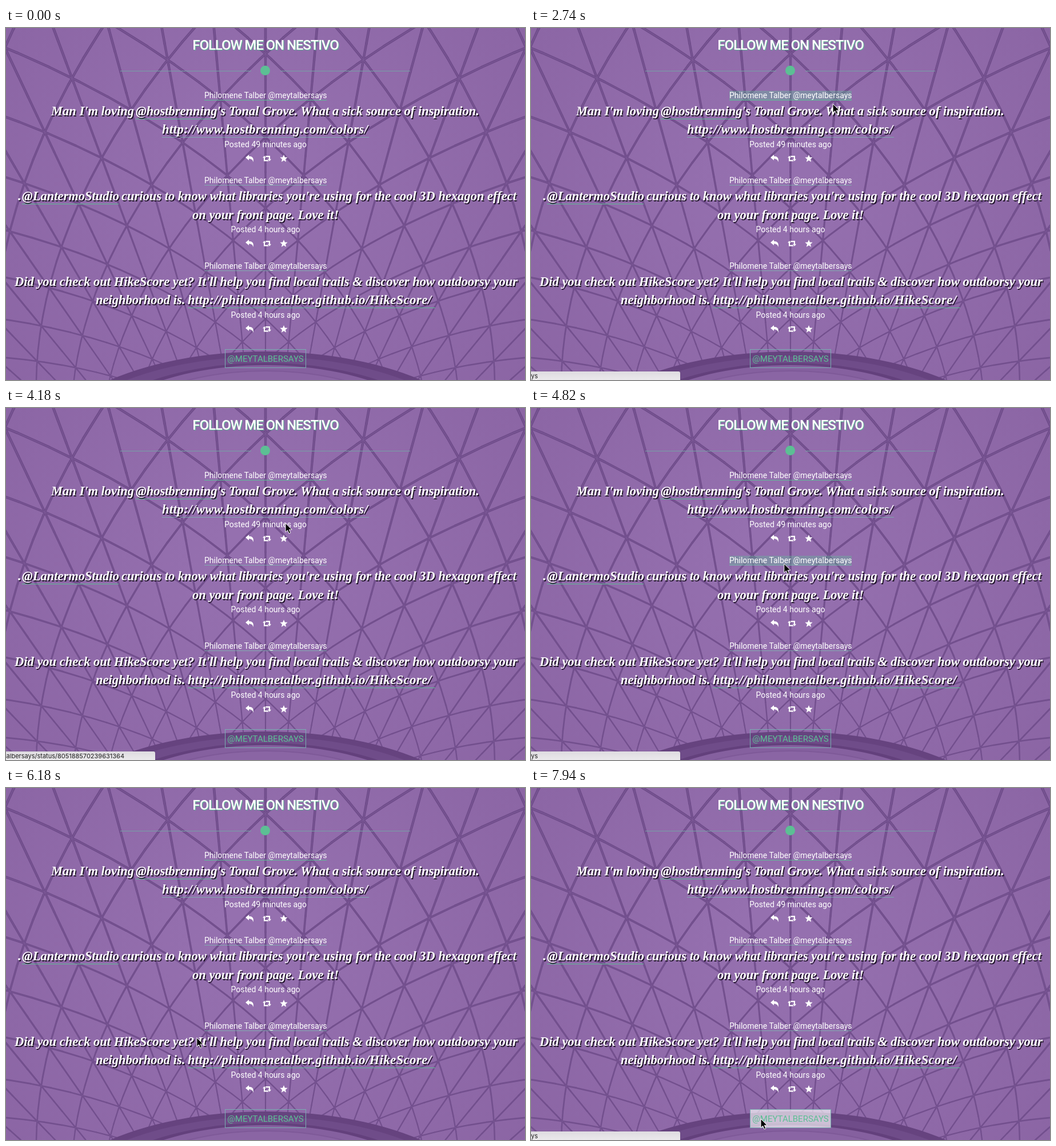
An HTML page with a canvas for the animation above (8000 ms loop, 908x617 px).

```html
<!DOCTYPE html>
<html lang="en">
<head>
<meta charset="utf-8">
<title>Follow me</title>
<style>
  html, body { margin: 0; width: 100%; height: 100%; overflow: hidden; background: #8f69a8; }
  #stage { position: relative; width: 908px; height: 617px; overflow: hidden; color: #fff;
    font: 14px Roboto, sans-serif; }
  #stage > * { position: absolute; white-space: pre; box-sizing: border-box; }
  canvas, svg { left: 0; top: 0; }
  h1 { margin: 0; left: 0; top: 18px; width: 908px; text-align: center; font-size: 24px; line-height: 24px;
    font-weight: 500; letter-spacing: -1.1px; text-shadow: 1px 1px 1px #5cbf94; }
  .rule { top: 75px; height: 1px; background: #74a3a5; }
  .dot { left: 445px; top: 66px; width: 17px; height: 17px; border-radius: 50%; background: #5cbf94; }
  .quote { font: italic bold 22.5px/28px "Liberation Serif", serif; text-shadow: 1.5px 1.5px 0 #1a1022; }
  .url { letter-spacing: .5px; }
  .name { height: 17px; line-height: 16px; text-align: center; }
  .quote.link { height: 28px; }
  .link { border-bottom: 1px solid #5cbf94; }
  .pale { border-color: rgba(120, 195, 175, .7); }
  .posted { left: 0; width: 908px; line-height: 20px; text-align: center; }
  .button { left: 383px; top: 563px; width: 142px; height: 33px; border: 1px solid #78aeb0; color: #5cbf94;
    font-size: 15px; line-height: 32px; display: flex; justify-content: center; }
  .bar { left: 0; top: 602px; width: 261px; height: 15px; border-radius: 0 3px 0 0;
    background: linear-gradient(#dedbe0, #ebe9ec); box-shadow: 0 0 1px #55406a; }
  .bar span { position: absolute; top: 1px; right: 54px; color: #1c1c1c; font: 11px/15px Inter, sans-serif; }
  .bar .short { right: auto; left: 0; }
</style>
</head>
<body>
<div id="stage">
  <canvas width="908" height="617"></canvas>
  <h1>FOLLOW ME ON NESTIVO</h1>
  <div class="rule" style="left:200px;width:229px"></div>
  <div class="dot"></div>
  <div class="rule" style="left:480px;width:227px"></div>
  <div class="button">@MEYTALBERSAYS</div>
  <svg id="icons" width="908" height="617" fill="#fff">
    <defs>
      <g id="actions">
        <path d="M419 227L425 222V224.8C431 224.8 434 228 432.500 235C431.500 231.500 430 229.300 425 229.300V232Z"/>
        <path id="turn" d="M452 224L455 227.600H453.200V231.200H458L459.600 233.400H451V227.600H449Z"/>
        <use href="#turn" transform="rotate(180 456.5 228.700)"/>
        <path id="star"/>
      </g>
    </defs>
  </svg>
  <div class="bar"><span></span></div>
  <svg width="908" height="617">
    <path id="cursor" d="M0 0V15.500L3.600 12.200L6.200 18L8.800 16.800L6.300 11.200H11.200Z"
      fill="#000" stroke="#fff" stroke-width="1"/>
  </svg>
</div>
<script>
const stage = document.getElementById('stage');
const icons = document.getElementById('icons');
const cursor = document.getElementById('cursor');
const button = stage.querySelector('.button');
const bar = stage.querySelector('.bar');
const label = bar.firstElementChild;

// Glass roof: radial beams crossed by two families of spirals, above an arch
function drawRoof() {
  const c = stage.querySelector('canvas').getContext('2d');
  const cx = 454, cy = 1000, inner = 415;
  const glow = c.createRadialGradient(430, 250, 60, 454, 300, 620);
  glow.addColorStop(0, '#9570af');
  glow.addColorStop(1, '#8a64a3');
  c.fillStyle = glow;
  c.fillRect(0, 0, 908, 617);

  const point = (r, a) => [cx + 1.2 * r * Math.sin(a), cy - r * Math.cos(a)];
  const beam = (start, twist, scale) => {
    const angle = r => start + twist * Math.log(r / inner);
    for (let r = inner; r < 1150; r *= 1.04) {
      c.lineWidth = r / 210 * scale;
      c.beginPath();
      c.moveTo(...point(r, angle(r)));
      c.lineTo(...point(r * 1.04, angle(r * 1.04)));
      c.stroke();
    }
  };
  const lattice = (color, scale) => {
    c.strokeStyle = color;
    const step = 0.15;
    for (let i = -14; i <= 14; i++) {
      beam(i * step, 0.9, scale);
      beam(i * step, -0.9, scale);
      beam(i * step / 2, 0, scale);
    }
  };
  c.lineCap = 'round';
  lattice('#6f4c8a', 1);
  lattice('#7b5896', 0.25);

  const arch = (rx, ry, fill) => {
    c.fillStyle = fill;
    c.beginPath();
    c.ellipse(cx, 760, rx, ry, 0, 0, 7);
    c.fill();
  };
  arch(405, 193, '#66437f');
  arch(385, 184, '#6f4c89');
  arch(350, 173, '#63407c');
  arch(335, 169, '#85609f');
  arch(310, 160, '#7e5998');
  arch(306, 158, '#8a65a4');
}

function add(text, cls, left, top, width) {
  const el = document.createElement('div');
  el.className = cls;
  el.textContent = text;
  if (left !== undefined) el.style.left = left + 'px';
  if (width) el.style.width = width + 'px';
  el.style.top = top + 'px';
  stage.insertBefore(el, button);
  return el;
}

function tweet(y, age, pale) {
  const name = add('Philomene Talber @meytalbersays', 'name link' + pale, 347, y + 110, 214);
  add('Posted ' + age + ' ago', 'posted', undefined, y + 194);
  const use = document.createElementNS('http://www.w3.org/2000/svg', 'use');
  use.setAttribute('href', '#actions');
  use.setAttribute('y', y);
  icons.append(use);
  return name;
}

const star = Array.from({ length: 10 }, (_, i) => {
  const r = i % 2 ? 3.1 : 7, a = i * Math.PI / 5;
  return (486 + r * Math.sin(a)).toFixed(2) + ' ' + (229 - r * Math.cos(a)).toFixed(2);
});
document.getElementById('star').setAttribute('d', 'M' + star.join('L') + 'Z');

drawRoof();
const name1 = tweet(0, '49 minutes', '');
add("Man I'm loving", 'quote', 79, 132);
add('@hostbrenning', 'quote link', 227, 132, 142);
add("'s Tonal Grove. What a sick source of inspiration.", 'quote', 369, 132);
const url1 = add('http://www.hostbrenning.com/colors/', 'quote url link pale', 273, 164, 362);

const name2 = tweet(149, '4 hours', ' pale');
add('.', 'quote', 21, 281);
add('@LantermoStudio', 'quote link', 28, 281, 169);
add("curious to know what libraries you're using for the cool 3D hexagon effect", 'quote', 202, 281);
add('on your front page. Love it!', 'quote', 326, 314);

tweet(299, '4 hours', ' pale');
add("Did you check out HikeScore yet? It'll help you find local trails & discover how outdoorsy your",
  'quote', 15, 431);
add('neighborhood is.', 'quote', 157, 463);
add('http://philomenetalber.github.io/HikeScore/', 'quote url link', 318, 463, 433);

// Each key: time in ms, then values
const path = [[420, 632, -18], [820, 606, 28], [1220, 606, 28], [1860, 542, 112], [2100, 535, 118],
  [2340, 533, 121], [2580, 533, 121], [3300, 511, 175], [3460, 507, 177], [3620, 504, 182],
  [4020, 504, 182], [4180, 489, 202], [4900, 437, 282], [5380, 420, 342], [5540, 420, 342],
  [6020, 335, 430], [6100, 335, 430], [6980, 322, 515], [7220, 333, 545], [7860, 402, 580]];
const fades = [
  [name1, '92,191,148', .7, [[1860, 0], [2020, 1], [2660, 1], [2820, 0]]],
  [url1, '92,191,148', .7, [[2980, 0], [3140, 1], [4020, 1], [4180, 0]]],
  [name2, '92,191,148', .7, [[4660, 0], [4740, 1], [4900, 0]]],
  [button, '255,255,255', .65, [[7780, 0], [7940, 1]]]
];
const barKeys = [[1940, 0], [2100, 1], [4980, 1], [5220, 0], [5620, 0], [5700, 1], [5860, 1], [6020, 0],
  [7700, 0], [7860, 1]];
const status = 'albersays/status/805188570239631364';
const labels = [[2900, 'ys'], [4100, ''], [4660, status], [5500, 'ys'], [6500, status], [8000, 'ys']];

function at(keys, t) {
  const n = keys.findIndex(k => k[0] > t);
  if (n < 0) return keys[keys.length - 1].slice(1);
  if (n === 0) return keys[0].slice(1);
  const [a, b] = [keys[n - 1], keys[n]];
  const f = (t - a[0]) / (b[0] - a[0]);
  return a.slice(1).map((v, i) => v + (b[i + 1] - v) * f);
}

const began = performance.now();
function frame() {
  const now = (performance.now() - began) % 8000;
  const t = Math.floor((now - 20) / 80) * 80 + 20; // motion ticks every 80 ms
  const [x, y] = at(path, t);
  cursor.setAttribute('transform', `translate(${x} ${y})`);
  cursor.style.visibility = t < 500 ? 'hidden' : 'visible';
  for (const [el, rgb, alpha, keys] of fades)
    el.style.backgroundColor = `rgba(${rgb},${at(keys, t)[0] * alpha})`;
  bar.style.opacity = at(barKeys, t)[0];
  const text = labels.find(l => t < l[0])[1];
  label.textContent = text;
  label.className = text === 'ys' ? 'short' : '';
  requestAnimationFrame(frame);
}
frame();
</script>
</body>
</html>
```
